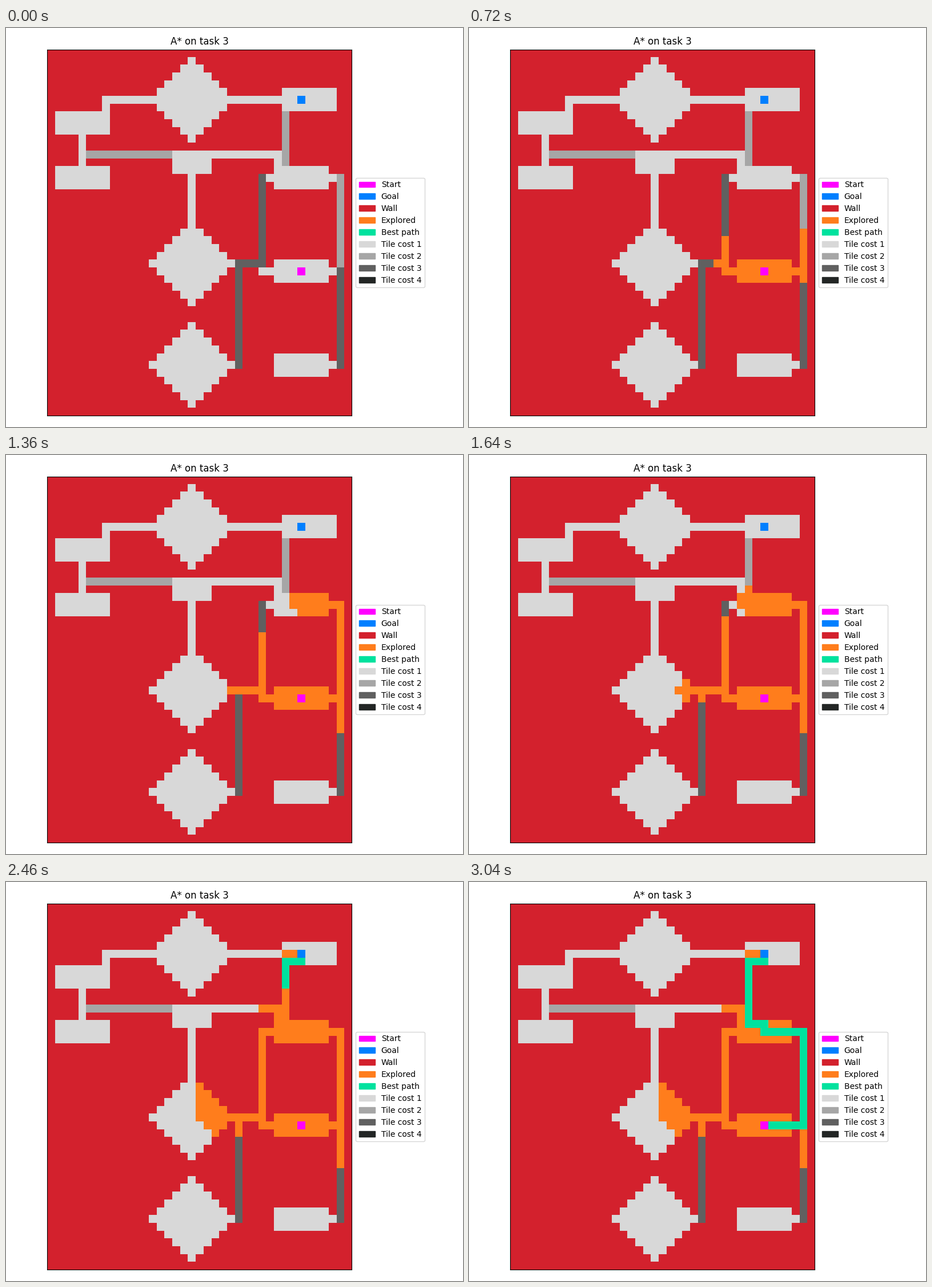
Write a matplotlib script that moves like this. It is 800 px wide and 700 px high and loops after 4.04 s.

```python
import numpy as np
import matplotlib.pyplot as plt
from matplotlib.animation import FuncAnimation
from matplotlib.colors import to_rgb
from matplotlib.patches import Patch

W, H, DPI = 800, 700, 100
ROWS, COLS = 47, 39
FRAMES, STEP_MS = 202, 20
START, GOAL = (28, 32), (6, 32)
MOVES = [(0, 1), (0, -1), (1, 0), (-1, 0)]

LEGEND = {
    "Start": "#ff00ff",
    "Goal": "#007fff",
    "Wall": "#d3212d",
    "Explored": "#ff7d1c",
    "Best path": "#00e29e",
    "Tile cost 1": "#d8d8d8",
    "Tile cost 2": "#a6a6a6",
    "Tile cost 3": "#606060",
    "Tile cost 4": "#232625",
}
RGB = {name: np.array(to_rgb(c)) for name, c in LEGEND.items()}


def build_map():
    """Grid of tile costs; 0 is wall."""
    cost = np.zeros((ROWS, COLS), int)

    def fill(r0, r1, c0, c1, value=1):
        cost[r0:r1 + 1, c0:c1 + 1] = value

    rr, cc = np.indices(cost.shape)
    for row in (6, 27, 40):
        cost[abs(rr - row) + abs(cc - 18) <= 5] = 1

    # rooms
    for row, col in ((5, 30), (8, 1), (15, 1), (15, 29), (27, 29), (39, 29)):
        fill(row, row + 2, col, col + 6)
    fill(13, 15, 16, 20)

    # corridors
    fill(6, 6, 7, 29)
    fill(6, 7, 7, 7)
    fill(11, 14, 4, 4)
    fill(13, 13, 5, 15, 2)
    fill(13, 13, 16, 29)
    fill(14, 14, 29, 29)
    fill(8, 14, 30, 30, 2)
    fill(16, 22, 18, 18)
    fill(16, 16, 28, 28)
    fill(16, 27, 27, 27, 3)
    fill(27, 27, 24, 27, 3)
    fill(28, 40, 24, 24, 3)
    fill(28, 28, 27, 28)
    for row in (16, 28, 40):
        fill(row, row, 36, 36)
    fill(16, 27, 37, 37, 2)
    fill(28, 40, 37, 37, 3)
    return cost


def astar(cost):
    """Return cells in order of expansion and the path from goal to start."""
    def dist(cell):
        return abs(cell[0] - GOAL[0]) + abs(cell[1] - GOAL[1])

    g, parent = {START: 0}, {}
    frontier = {START: dist(START)}  # insertion order breaks ties
    explored = []
    while True:
        cell = min(frontier, key=frontier.get)
        del frontier[cell]
        if cell == GOAL:
            break
        if cell != START:
            explored.append(cell)
        for dr, dc in MOVES:
            nxt = cell[0] + dr, cell[1] + dc
            if cost[nxt] == 0:
                continue
            new_g = g[cell] + cost[nxt]
            if new_g < g.get(nxt, np.inf):
                g[nxt], parent[nxt] = new_g, cell
                frontier.pop(nxt, None)
                frontier[nxt] = new_g + dist(nxt)

    path = []
    cell = parent[GOAL]
    while cell != START:
        path.append(cell)
        cell = parent[cell]
    return explored, path


cost = build_map()
explored, path = astar(cost)
steps = [(c, "Explored") for c in explored] + [(c, "Best path") for c in path]

base = np.empty((ROWS, COLS, 3))
base[:] = RGB["Wall"]
for value in (1, 2, 3):
    base[cost == value] = RGB[f"Tile cost {value}"]
base[START], base[GOAL] = RGB["Start"], RGB["Goal"]

fig = plt.figure(figsize=(W / DPI, H / DPI), dpi=DPI, facecolor="white")
ax = fig.add_axes([71.9 / W, 19.55 / H, 533.45 / W, 642.9 / H])
image = ax.imshow(base, interpolation="nearest", aspect="auto")
ax.set_xticks([])
ax.set_yticks([])
ax.set_title("A* on task 3")
ax.legend(handles=[Patch(color=c, label=name) for name, c in LEGEND.items()],
          loc="center left", bbox_to_anchor=(1, 0.5))


def draw(frame):
    picture = base.copy()
    for cell, kind in steps[:max(0, frame - 1)]:
        picture[cell] = RGB[kind]
    image.set_data(picture)
    return [image]


anim = FuncAnimation(fig, draw, frames=FRAMES, interval=STEP_MS,
                     repeat=True, repeat_delay=0, blit=False)
plt.show()
```
